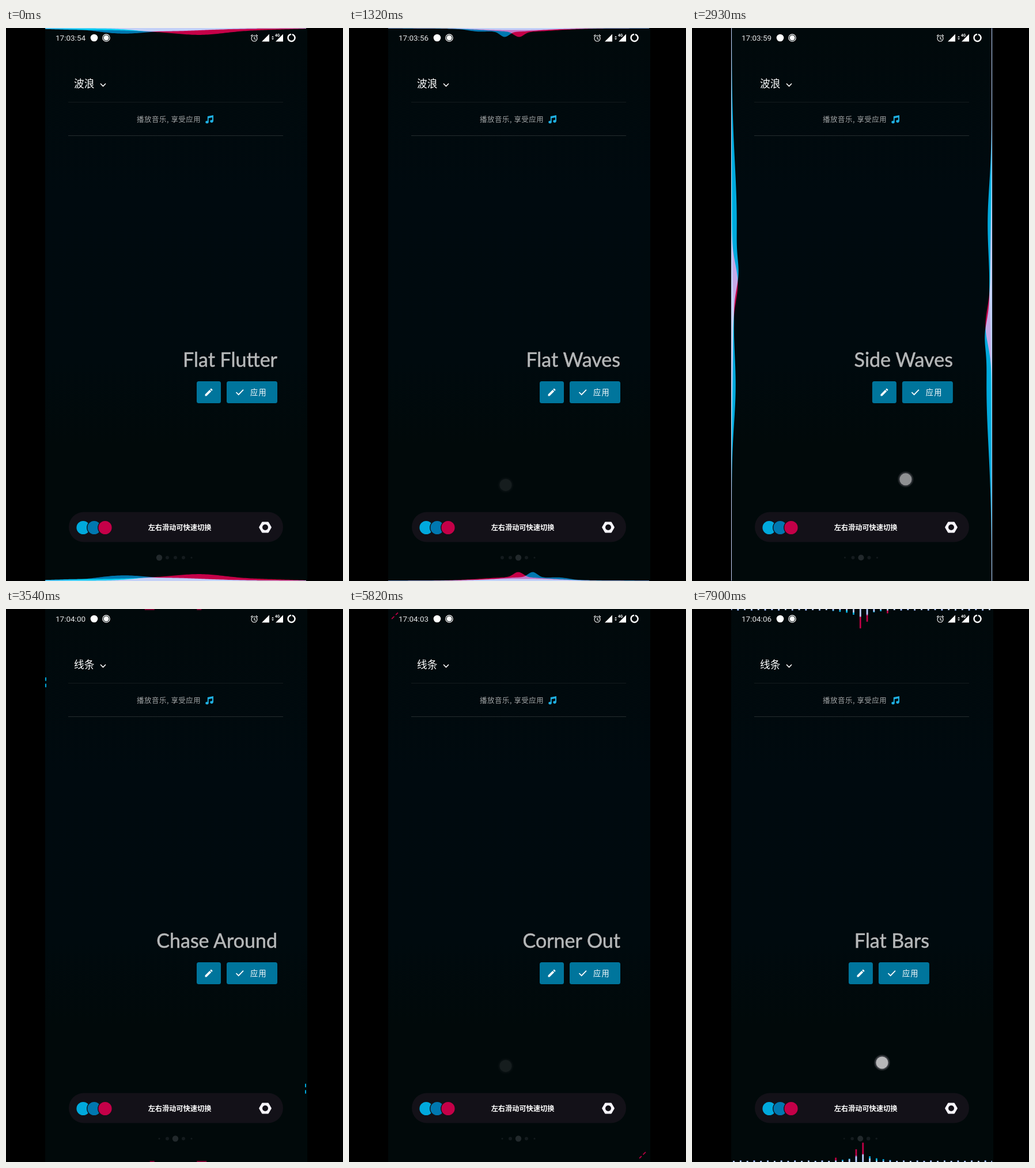
Recreate the animation shown at these times as an HTML page. Size 585 by 958 pixels, loop 8000 ms.

```html
<!DOCTYPE html>
<html lang="zh-CN">
<head>
<meta charset="utf-8">
<title>Edge visualizer</title>
<style>
  html, body { margin: 0; width: 100%; height: 100%; overflow: hidden; background: #000; }
  svg { display: block; width: 100vw; height: 100vh; }
  text { font-family: "Noto Sans CJK SC", "Noto Sans CJK", sans-serif; fill: #fff; }
  .title { font: 34px Lato, sans-serif; fill: #b6b8b9; stroke: #b6b8b9; stroke-width: .5; text-anchor: end; }
  .clock { font: 13.5px Roboto, sans-serif; fill: #e4e6e7; }
  .line { fill: none; stroke: #fff; }
  #edges { isolation: isolate; }
  #edges path { mix-blend-mode: screen; }
</style>
</head>
<body>
<svg viewBox="0 0 585 958">
  <defs>
    <linearGradient id="panel" x2="0" y2="1">
      <stop stop-color="#01090b"/><stop offset=".3" stop-color="#000a0f"/>
      <stop offset=".6" stop-color="#000a0e"/><stop offset=".75" stop-color="#01090a"/>
    </linearGradient>
    <radialGradient id="halo">
      <stop offset=".7" stop-color="#55555c"/><stop offset="1" stop-color="#55555c" stop-opacity="0"/>
    </radialGradient>
    <clipPath id="screen"><path d="M68 0H521V958H68Z"/></clipPath>
  </defs>
  <rect width="585" height="958"/>
  <rect x="68" width="455" height="958" fill="url(#panel)"/>
  <g id="edges" clip-path="url(#screen)"></g>

  <text id="clock" class="clock" x="86" y="22"></text>
  <circle cx="153" cy="17" r="6.3" fill="#fff"/>
  <circle cx="174" cy="17" r="6.2" class="line" stroke-width="1.2"/>
  <circle cx="174" cy="17" r="4.5" fill="#fff"/>
  <g class="line" stroke-width="1.1">
    <circle cx="431" cy="18" r="5"/>
    <path d="M431 15V18.5L433.5 20M425 14L428 11.5M437 14L434 11.5"/>
    <circle cx="495.5" cy="17" r="6" stroke-width="2.5" stroke-dasharray="35 2.7" transform="rotate(-78 495.5 17)"/>
  </g>
  <path d="M444 23.5H457V10.5ZM468 23.5H481V10.5ZM461 16.3H465L463 14ZM461 18H465L463 20.3Z" fill="#fff"/>
  <text x="467" y="14.5" style="font:bold 6.5px Roboto,sans-serif">4G</text>

  <text id="category" x="118" y="103" font-size="17.7"></text>
  <path class="line" d="M164 96.3L168.5 100.8L173 96.3" stroke-width="1.6"/>
  <path d="M108 128.5H481" stroke="#141b1d"/>
  <path d="M108 186.5H481" stroke="#252c2e"/>
  <text x="227" y="162.5" font-size="12.4" letter-spacing=".6" style="fill:#a3a6a7">播放音乐, 享受应用</text>
  <g fill="#1fb0e2">
    <ellipse cx="349" cy="163" rx="2.7" ry="2.3"/><ellipse cx="357" cy="161.6" rx="2.7" ry="2.3"/>
    <path d="M349.8 153L360 151V161.6H358V155L351.7 156.3V163H349.8Z"/>
  </g>

  <g id="pages" clip-path="url(#screen)"></g>

  <rect x="109" y="838.5" width="372" height="52" rx="26" fill="#131118"/>
  <g stroke="#131118" stroke-width="1.4">
    <circle cx="134" cy="865.5" r="12.3" fill="#00a9dd"/>
    <circle cx="153" cy="865.5" r="12.3" fill="#0078b0"/>
    <circle cx="172" cy="865.5" r="12.3" fill="#c40048"/>
  </g>
  <text x="301.5" y="870" font-size="12.2" font-weight="700" text-anchor="middle">左右滑动可快速切换</text>
  <path d="M440.5 865L445.2 856.8H454.8L459.5 865L454.8 873.2H445.2Z" fill="#f6f4fa" stroke="#f6f4fa" stroke-width="2.6" stroke-linejoin="round"/>
  <circle cx="450" cy="865" r="5" fill="#131118"/>
  <g id="dots"></g>
  <g id="touch" opacity="0"><circle r="14.5" fill="url(#halo)"/><circle r="10.5" fill="#b7b7b9"/></g>
</svg>
<script>
const LOOP = 8000, LEFT = 68, RIGHT = 521, HEIGHT = 958, PAGE_WIDTH = 453;
const DRAG_TIME = 200, DRAG_LENGTH = 117, SETTLED = 340;
const swipes = [970, 1850, 2900, 3900, 5470, 6900, 7800];
const colors = ['#00a9dd', '#0078b0', '#c40048'];
const byId = id => document.getElementById(id);
const clamp = (x, lo = 0, hi = 1) => Math.min(hi, Math.max(lo, x));
const mod = (x, n) => (x % n + n) % n;

// Ways of laying a shape drawn along one edge onto the screen
const onTop = (u, d) => [u, d];
const onBottom = (u, d) => [u, HEIGHT - d];
const halfTurn = (u, d) => [LEFT + RIGHT - u, HEIGHT - d];
const onLeft = (u, d) => [LEFT + d, u];
const onRight = (u, d) => [RIGHT - d, HEIGHT - u];

const box = (x, y, w, h) => [[x, y], [x + w, y], [x + w, y + h], [x, y + h]];

// A wave is a sum of bumps [center, depth, width] that sway and pulse
function wave(bumps, t, from, to, base) {
  const points = [[from, 0]];
  for (let u = from; u <= to; u += 3) {
    let depth = base;
    bumps.forEach(([center, size, width], k) => {
      const sway = width * .25 * Math.sin(t / 350 * (k % 2 ? -1 : 1));
      const pulse = .75 + .25 * Math.cos(t / (130 + 30 * k));
      depth += size * pulse * Math.exp(-(((u - center - sway) / width) ** 2));
    });
    points.push([u, depth]);
  }
  return [...points, [to, 0]];
}
const waves = (layers, from, to, base) => t => layers.map(bumps => [wave(bumps, t, from, to, base)]);

function drawChase(t) {
  const out = mod(t * .25 + 36, 225), y = mod(119 - t * .5, HEIGHT);
  return [
    [box(LEFT, y, 2, 6), box(LEFT, y + 11, 2, 6)],
    [],
    [box(277 - out, 0, 17, 2), box(295 + out, 0, 8, 2)]
  ];
}

function drawStreaks(t) {
  const half = 51 + 40 * Math.sin(t / 170), x = 301 + 60 * Math.sin(t / 260);
  return [[], [[[x - half, 0], [x - half + 9, 1.7], [x + half - 9, 1.7], [x + half, 0]]], []];
}

function drawCorner(t) {
  const reach = mod(22 + t * .06, 42);
  const dash = (a, b) => {
    const x0 = LEFT + reach * a, y0 = reach * (1 - a), x1 = LEFT + reach * b, y1 = reach * (1 - b);
    return [[x0, y0], [x1, y1], [x1 + 1.2, y1 + 1.2], [x0 + 1.2, y0 + 1.2]];
  };
  return [[], [], [dash(.25, .45), dash(.57, .74)]];
}

function drawBars(t) {
  const peaks = [
    { 15: 1, 16: 3, 17: 4, 18: 8, 19: 11, 20: 7, 21: 3, 22: 2 },
    { 17: 2, 18: 5, 19: 10, 20: 9, 21: 3 },
    { 18: 4, 19: 31, 20: 20, 21: 2, 23: 5 }
  ];
  return peaks.map((peak, k) => Array.from({ length: 39 }, (_, i) => {
    const beat = .7 + .3 * Math.cos(t / 110 * (1 + (i * 7 + k) % 3 / 3));
    return box(LEFT + i * 11.8 - 1.3, 0, 2.7, 2 + (i % 2) * .6 + (peak[i] || 0) * beat);
  }));
}

const drawFlutter = waves([
  [[270, 5, 100], [120, 2, 60]],
  [[200, 8, 60], [300, 3, 90]],
  [[335, 11, 70], [245, 3, 45], [450, 2, 60]]
], LEFT, RIGHT, .8);
const drawFlat = waves([
  [[290, 3, 90]],
  [[270, 9, 11], [280, 6, 70], [222, 2.5, 20]],
  [[295, 9, 12], [300, 6, 80]]
], LEFT, RIGHT, .6);
const drawSide = waves([
  [[300, 12, 150], [435, 10, 35], [600, 13, 90]],
  [[330, 2, 120], [520, 6, 60], [620, 3, 70]],
  [[430, 13, 45], [560, 4, 110]]
], 0, HEIGHT, 1);

// "at" is the moment when the effect's own clock reads zero
const effects = [
  { title: 'Flat Flutter', at: 0, draw: drawFlutter, lay: [onTop, onBottom] },
  { title: 'Flat Waves', at: 1320, draw: drawFlat, lay: [onTop, halfTurn] },
  { title: 'Side Waves', at: 2330, draw: drawSide, lay: [onLeft, onRight] },
  { title: 'Chase Around', at: 3540, draw: drawChase, lay: [onTop, halfTurn], redAlpha: .62 },
  { title: 'Flat Streaks', at: 4420, draw: drawStreaks, lay: [onTop] },
  { title: 'Corner Out', at: 5820, draw: drawCorner, lay: [onTop, halfTurn] },
  { title: 'Flat Bars', at: 7900, draw: drawBars, lay: [onTop, halfTurn] }
];

byId('edges').innerHTML = colors.map(c => `<path fill="${c}"/>`).join('');
byId('pages').innerHTML = effects.map(effect => `<g>
  <text class="title" x="471" y="587">${effect.title}</text>
  <rect x="331" y="612" width="42" height="38" rx="3.5" fill="#00759c"/>
  <rect x="383" y="612" width="88" height="38" rx="3.5" fill="#00759c"/>
  <path transform="translate(343.4 622.4) scale(.72)" fill="#fff" d="M3 17.25V21h3.75L17.81 9.94l-3.75-3.75zM20.71 7.04a1 1 0 0 0 0-1.41l-2.34-2.34a1 1 0 0 0-1.41 0l-1.83 1.83 3.75 3.75z"/>
  <path class="line" stroke-width="1.7" d="M399.5 631L403.7 635.2L412 626.7"/>
  <text x="424" y="636" font-size="13.2" letter-spacing="1.2">应用</text></g>`).join('');
byId('dots').innerHTML = '<circle cy="917.5"/>'.repeat(12);
const edgePaths = [...byId('edges').children];
const pageGroups = [...byId('pages').children];
const dotCircles = [...byId('dots').children];

// Share of a page turned, a given time after the finger lands
function turn(age) {
  const dragged = DRAG_LENGTH / PAGE_WIDTH;
  if (age < DRAG_TIME) return clamp(age / DRAG_TIME) * dragged;
  const fling = clamp((age - DRAG_TIME) / (SETTLED - DRAG_TIME));
  return dragged + (1 - dragged) * (1 - (1 - fling) ** 3);
}

function drawEdges(effect, t) {
  effect.draw(t - effect.at).forEach((shapes, k) => {
    const d = effect.lay.flatMap(lay => shapes.map(points =>
      'M' + points.map(([u, v]) => lay(u, v).map(n => n.toFixed(2)).join()).join('L') + 'Z'));
    edgePaths[k].setAttribute('d', d.join(''));
    edgePaths[k].setAttribute('fill-opacity', k === 2 && effect.redAlpha || 1);
  });
}

function drawDots(position) {
  const selected = position < 1 ? position * 2 : position + 1;
  const scroll = Math.max(0, selected - 2);
  dotCircles.forEach((dot, i) => {
    const slot = i - scroll, near = clamp(1 - Math.abs(i - selected));
    const inset = Math.min(slot + Math.max(0, 1 - scroll), 4 - slot);
    const r = clamp(1.5 + 1.5 * inset, 0, 3);
    dot.setAttribute('cx', 266 + 14 * slot);
    dot.setAttribute('r', r + (5.2 - r) * near);
    dot.setAttribute('fill', near > .5 ? '#22292c' : '#141b1e');
  });
}

function drawTouch(t) {
  const start = swipes.find(s => t >= s && t < s + 370);
  if (start === undefined) return byId('touch').setAttribute('opacity', 0);
  const age = t - start, moved = clamp(age / DRAG_TIME) * DRAG_LENGTH;
  byId('touch').setAttribute('opacity', clamp(age / 40) * clamp((370 - age) / 170));
  byId('touch').setAttribute('transform', `translate(${389 - moved} ${780 + moved * .1})`);
}

function render(now) {
  const t = mod(now, LOOP);
  const position = swipes.reduce((sum, s) => sum + turn(t - s), 0);
  const active = swipes.filter(s => t >= s + DRAG_TIME).length;
  const seconds = 54 + Math.floor(t * .0015 + .8);
  const pad = n => String(n).padStart(2, '0');
  byId('clock').textContent = `17:${pad(3 + Math.floor(seconds / 60))}:${pad(seconds % 60)}`;
  byId('category').textContent = active < 3 ? '波浪' : '线条';
  pageGroups.forEach((group, i) => group.setAttribute('transform', `translate(${(i - position) * PAGE_WIDTH} 0)`));
  drawEdges(effects[Math.min(active, effects.length - 1)], t);
  drawDots(position);
  drawTouch(t);
}

const startTime = performance.now();
function loop() {
  render(performance.now() - startTime);
  requestAnimationFrame(loop);
}
loop();
</script>
</body>
</html>
```
